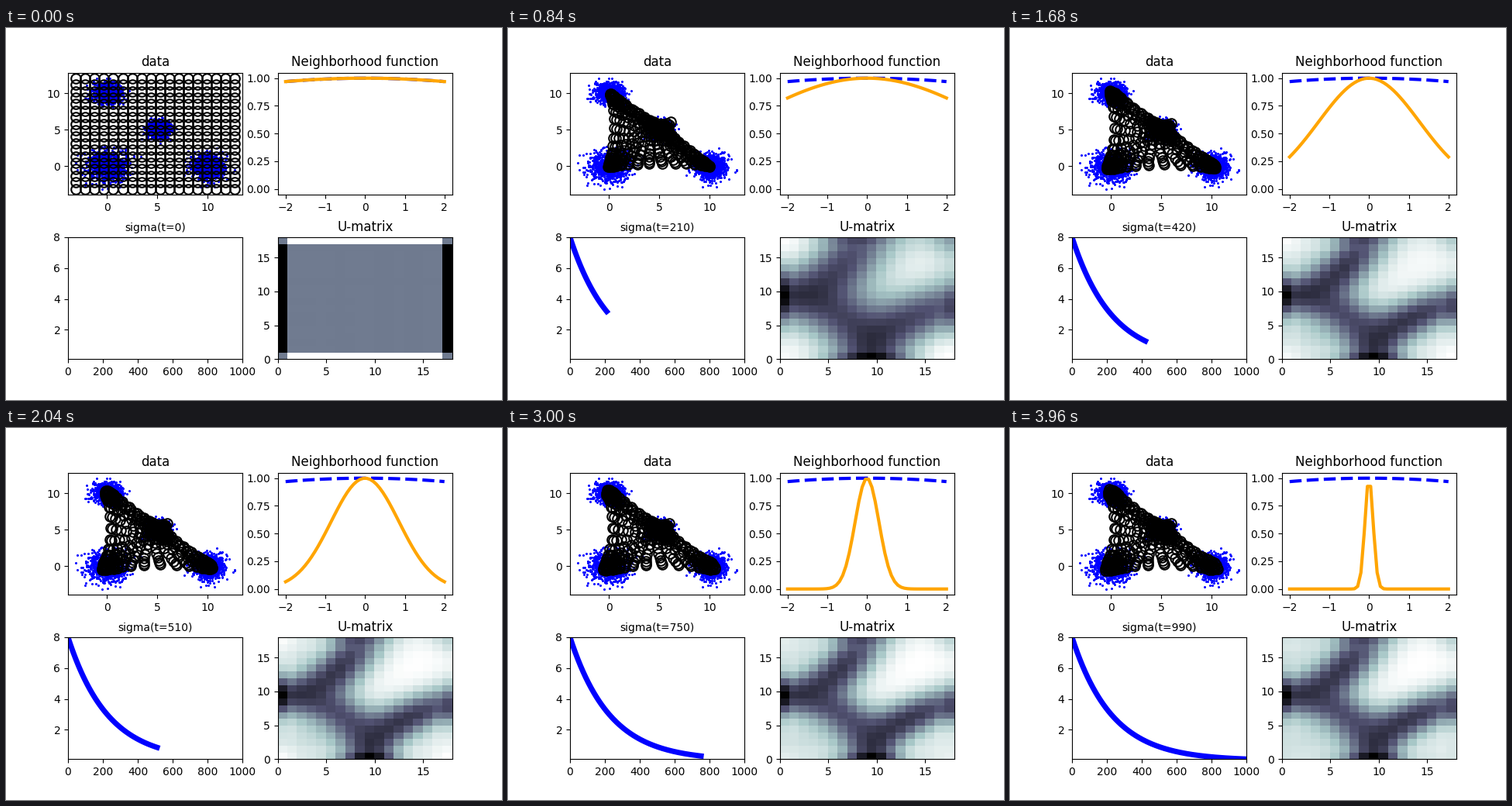
A matplotlib script that plays this animation: 640x480 px, repeating every 4.06 s.

```python
import numpy as np
import matplotlib.pyplot as plt
from matplotlib.animation import FuncAnimation

SIDE = 18          # neurons per side of the map
T_MAX = 1000
STRIDE = 5         # training steps per frame
LAST = 198         # last frame that still trains
FRAMES = 203       # the final state is held for the rest

plt.rcParams["text.kerning_factor"] = 6   # whole-pixel letter spacing


def sigma(t):
    return 8 * (0.1 / 8) ** (t / T_MAX)


def rate(t):
    return 0.1 * 0.1 ** (t / T_MAX)


def neighborhood(d2, s):
    return np.exp(-d2 / (2 * s * s))


def make_data():
    rng = np.random.default_rng(4)
    extremes = np.array([(-3.09, 0.5), (12.67, -0.5), (0.3, 12.04), (-0.5, -3.11)])
    blobs = [((0, 0), 1.0), ((10, 0), 0.8), ((0, 10), 0.7), ((5, 5), 0.55)]
    pts = np.vstack([rng.normal(c, s, (1000, 2)) for c, s in blobs])
    low, high = extremes.min(0), extremes.max(0)
    inside = np.all((pts > low) & (pts < high), axis=1)
    return np.vstack([pts[inside], extremes])


def start_map(data):
    (x0, y0), (x1, y1) = data.min(0), data.max(0)
    gx, gy = np.meshgrid(np.linspace(x0, x1, SIDE), np.linspace(y0, y1, SIDE),
                         indexing="ij")
    return np.column_stack([gx.ravel(), gy.ravel()])


def train(data):
    """Return the neuron positions for every frame."""
    cells = np.indices((SIDE, SIDE)).reshape(2, -1).T
    d2 = ((cells[:, None] - cells[None]) ** 2).sum(-1)
    w = start_map(data)
    states = [w]
    n = SIDE * SIDE
    for k in range(LAST):
        t = k * STRIDE
        best = ((w ** 2).sum(1) - 2 * data @ w.T).argmin(1)
        hits = np.bincount(best, minlength=n)
        sums = np.column_stack([np.bincount(best, data[:, c], n) for c in (0, 1)])
        h = neighborhood(d2, sigma(t))
        pull = h @ sums - (h @ hits)[:, None] * w
        w = w + STRIDE * rate(t) * pull / len(data)
        states.append(w)
    return states


def u_matrix(w):
    """Mean distance of each neuron to its direct neighbours."""
    g = w.reshape(SIDE, SIDE, 2)
    down = np.linalg.norm(np.diff(g, axis=0), axis=-1)
    side = np.linalg.norm(np.diff(g, axis=1), axis=-1)
    total = np.zeros((SIDE, SIDE))
    count = np.zeros((SIDE, SIDE))
    for part, value in ((total, (down, side)), (count, (1, 1))):
        part[:-1] += value[0]
        part[1:] += value[0]
        part[:, :-1] += value[1]
        part[:, 1:] += value[1]
    return total / count


data = make_data()
states = train(data)

fig, axes = plt.subplots(2, 2, figsize=(6.4, 4.8), dpi=100)
fig.subplots_adjust(left=0.125, right=0.9, bottom=0.11, top=0.88,
                    wspace=0.2, hspace=0.35)
(ax_data, ax_hood), (ax_sigma, ax_u) = axes

ax_data.set_title("data")
ax_data.plot(*data.T, "o", color="blue", ms=1, mew=1.2)
neurons, = ax_data.plot(*states[0].T, "o", ms=9, mfc="none", mec="black", mew=1.5)
ax_data.set(xlim=(-3.88, 13.46), ylim=(-3.87, 12.8),
            xticks=[0, 5, 10], yticks=[0, 5, 10])

ax_hood.set_title("Neighborhood function")
xs = np.linspace(-2, 2, 50)
ax_hood.plot(xs, neighborhood(xs ** 2, sigma(0)), "--", color="blue", lw=3)
hood, = ax_hood.plot([], [], color="orange", lw=3)
ax_hood.set(xlim=(-2.2, 2.2), ylim=(-0.05, 1.05),
            xticks=range(-2, 3), yticks=np.linspace(0, 1, 5))

sigma_title = ax_sigma.set_title("", fontsize=10)
sigma_line, = ax_sigma.plot([], [], color="blue", lw=5)
ax_sigma.set(xlim=(0, T_MAX), ylim=(0.1, 8), yticks=[2, 4, 6, 8])

ax_u.set_title("U-matrix")
u_cells = ax_u.pcolor(u_matrix(states[0]), cmap="bone_r")
ax_u.set(xlim=(0, SIDE), ylim=(0, SIDE),
         xticks=[0, 5, 10, 15], yticks=[0, 5, 10, 15])


def update(frame):
    k = min(frame, LAST)
    t = k * STRIDE
    neurons.set_data(*states[k].T)
    hood.set_data(xs, neighborhood(xs ** 2, sigma(t)))
    steps = np.arange(0, t + 1, STRIDE)
    sigma_line.set_data(steps, sigma(steps))
    sigma_line.set_visible(t > 0)
    sigma_title.set_text(f"sigma(t={t})")
    u = u_matrix(states[k])
    u_cells.set_array(u)
    u_cells.set_clim(u.min(), u.max())
    return neurons, hood, sigma_line, sigma_title, u_cells


anim = FuncAnimation(fig, update, frames=FRAMES, interval=20,
                     repeat=True, repeat_delay=0, blit=False)
plt.show()
```
